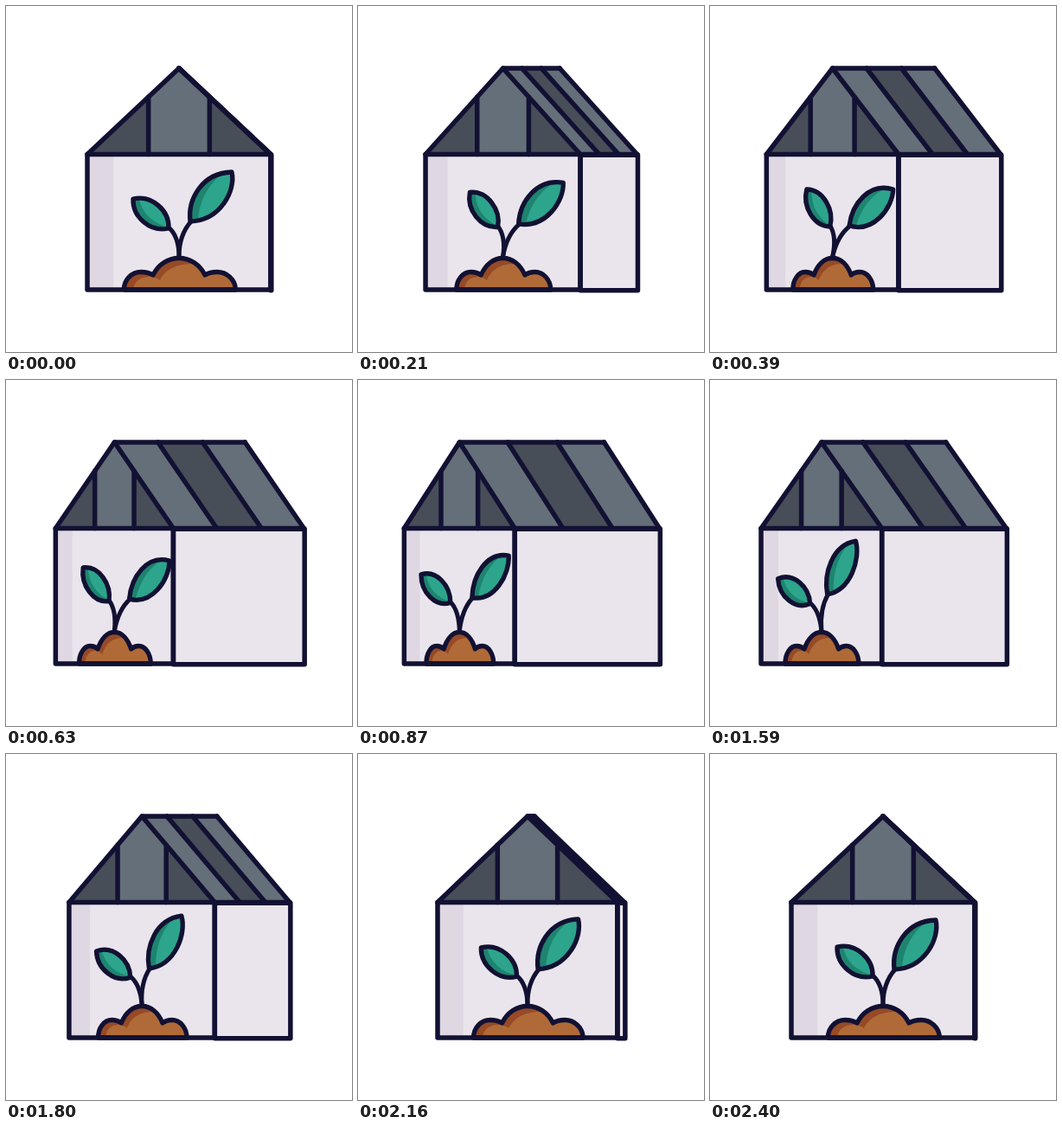
Recreate the animation shown at these times as an HTML page with a canvas. Size 400 px wide and 400 px high, loop 4430 ms.

```html
<!DOCTYPE html>
<html lang="en">
<head>
<meta charset="utf-8">
<title>Greenhouse</title>
<style>
  html, body { margin: 0; width: 100%; height: 100%; overflow: hidden; background: #fff; }
  canvas { display: block; width: 100vw; height: 100vh; }
</style>
</head>
<body>
<canvas id="stage" width="400" height="400"></canvas>
<script>
const ctx = document.getElementById('stage').getContext('2d');
const LOOP = 4430, ACTIVE = 2400, STEP = 30;
const TOP = 72, EAVE = 171.5, BASE = 328;
const NUDGE = .8; // the side wall sits slightly lower and further right
const STRIPS = [0, .333, .675, 1];
const INK = '#121133';
const WALL = '#eae5ec', WALL_SHADE = '#dfd8e3';
const SLATE = '#656f79', SLATE_DARK = '#474e58';
const SOIL = '#b06a37', SOIL_DARK = '#964a26';
const LEAF = '#2ca58c', LEAF_DARK = '#1e846f';

// [time, value] keys: how far the house has turned
const TURN = [[0, 0], [390, .667], [540, .805], [870, .945], [1110, 1],
  [1350, .966], [1620, .785], [1800, .49], [2160, .046], [2400, 0]];

// Plant parts, relative to the foot of the stem
const MOUND = new Path2D('M-63.5 38C-64 27-55 17.5-44 17.5C-39 17.5-34 18.5-30 21C-24 9-13 1.5 0 1.5C13 1.5 24 9 30 21C34 18.5 39 17.5 44 17.5C55 17.5 65 26 65.5 38Z');
const MOUND_LIT = new Path2D('M-53 40C-53 28-44 23-34 23C-29 23-25 25-22 27C-16 15-4 8 17 8L20 0L80 0L80 40Z');

// Each leaf swings on its own stem (sway in degrees); the larger one lags
const LEAVES = [
  { stem: new Path2D('M0 0C0-19 5-31 14-41'),
    shape: new Path2D('M61-98C66-77 48-42 13-41C10-66 26-97 61-98Z'),
    lit: new Path2D('M56-100C36-88 22-66 22-38L70-38L70-100Z'),
    squeeze: .63,
    sway: [[0, 0], [390, 15.6], [870, 9.2], [1350, -4.5], [1560, -6],
      [1800, -4.8], [2160, -1], [2400, 0]] },
  { stem: new Path2D('M0 0C0-17-5-28-12-34'),
    shape: new Path2D('M-53-67C-31-72-11-53-12-33C-33-28-54-46-53-67Z'),
    lit: new Path2D('M-47-70C-43-49-30-38-8-33L0-50L-20-75Z'),
    squeeze: .5,
    sway: [[0, 0], [390, 14.4], [870, -2], [1350, -8],
      [1800, -5], [2160, -1], [2400, 0]] }
];

const lerp = (a, b, k) => a + (b - a) * k;

// Monotone cubic through the keys
function sample(keys, t) {
  const slope = i => (keys[i + 1][1] - keys[i][1]) / (keys[i + 1][0] - keys[i][0]);
  const tangent = i => {
    if (i === 0) return slope(0) * .8;
    if (i === keys.length - 1) return 0;
    const a = slope(i - 1), b = slope(i);
    return a * b > 0 ? 2 * a * b / (a + b) : 0;
  };
  let i = 0;
  while (i < keys.length - 2 && t >= keys[i + 1][0]) i++;
  const [t0, v0] = keys[i], [t1, v1] = keys[i + 1];
  const d = t1 - t0, u = (t - t0) / d, w = 1 - u;
  return v0 * (1 + 2 * u) * w * w + v1 * u * u * (3 - 2 * u)
    + d * u * w * (tangent(i) * w - tangent(i + 1) * u);
}

function poly(color, ...pts) {
  ctx.beginPath();
  pts.forEach(([x, y]) => ctx.lineTo(x, y));
  ctx.closePath();
  ctx.fillStyle = color;
  ctx.fill();
}

function line(...pts) {
  ctx.beginPath();
  pts.forEach(([x, y]) => ctx.lineTo(x, y));
  ctx.stroke();
}

// Transforms the path only, so the line weight stays constant
function placed(path, matrix) {
  const out = new Path2D();
  out.addPath(path, matrix);
  return out;
}

function shaded(shape, lit, dark, light, matrix) {
  const outline = placed(shape, matrix);
  ctx.fillStyle = dark;
  ctx.fill(outline);
  ctx.save();
  ctx.clip(outline);
  ctx.fillStyle = light;
  ctx.fill(placed(lit, matrix));
  ctx.restore();
  ctx.stroke(outline);
}

function drawPlant(cx, scale, t) {
  const foot = new DOMMatrix().translate(cx, 290);
  for (const { stem, shape, lit, squeeze, sway } of LEAVES) {
    const m = foot.scale(lerp(1, scale, squeeze), 1).rotate(sample(sway, t));
    ctx.lineWidth = 5;
    ctx.stroke(placed(stem, m));
    ctx.lineWidth = 5.3;
    shaded(shape, lit, LEAF_DARK, LEAF, m);
  }
  shaded(MOUND, MOUND_LIT, SOIL_DARK, SOIL, foot.scale(scale, 1));
}

function draw(t) {
  const turn = sample(TURN, t);
  const left = lerp(94, 51, turn), split = lerp(306, 174, turn), right = lerp(306, 351, turn);
  const front = split - left, side = right - split, apex = left + front / 2;
  const strip = k => [[apex + side * STRIPS[k], TOP], [split + side * STRIPS[k], EAVE]];
  const a = left + front / 3, b = split - front / 3, beam = lerp(EAVE, TOP, 2 / 3);
  const wall = [[split, EAVE + NUDGE], [right + NUDGE, EAVE + NUDGE],
    [right + NUDGE, BASE + NUDGE], [split, BASE + NUDGE]];

  ctx.fillStyle = '#fff';
  ctx.fillRect(0, 0, 400, 400);
  ctx.strokeStyle = INK;
  ctx.lineCap = ctx.lineJoin = 'round';

  poly(WALL, ...wall);
  poly(WALL, [left, EAVE], [split, EAVE], [split, BASE], [left, BASE]);
  ctx.fillStyle = WALL_SHADE;
  ctx.fillRect(left, EAVE, front * .143, BASE - EAVE);

  for (let k = 0; k < 3; k++) {
    const [p, q] = strip(k), [r, s] = strip(k + 1);
    poly(k === 1 ? SLATE_DARK : SLATE, p, r, s, q);
  }
  poly(SLATE_DARK, [apex, TOP], [split, EAVE], [left, EAVE]);
  poly(SLATE, [a, EAVE], [a, beam], [apex, TOP], [b, beam], [b, EAVE]);

  drawPlant(apex, front / 212, t);

  ctx.lineWidth = 5.5;
  line([a, EAVE], [a, beam]);
  line([b, EAVE], [b, beam]);
  for (let k = 0; k <= 3; k++) line(...strip(k));
  line([left, EAVE], [apex, TOP], [apex + side, TOP]);
  line([split, EAVE], [right, EAVE]);
  line(...wall, wall[0]);
  line([left, EAVE], [split, EAVE], [split, BASE], [left, BASE], [left, EAVE]);
}

function tick() {
  const t = performance.now() % LOOP;
  draw(Math.min(ACTIVE, Math.floor(t / STEP) * STEP));
  requestAnimationFrame(tick);
}
tick();
</script>
</body>
</html>
```
